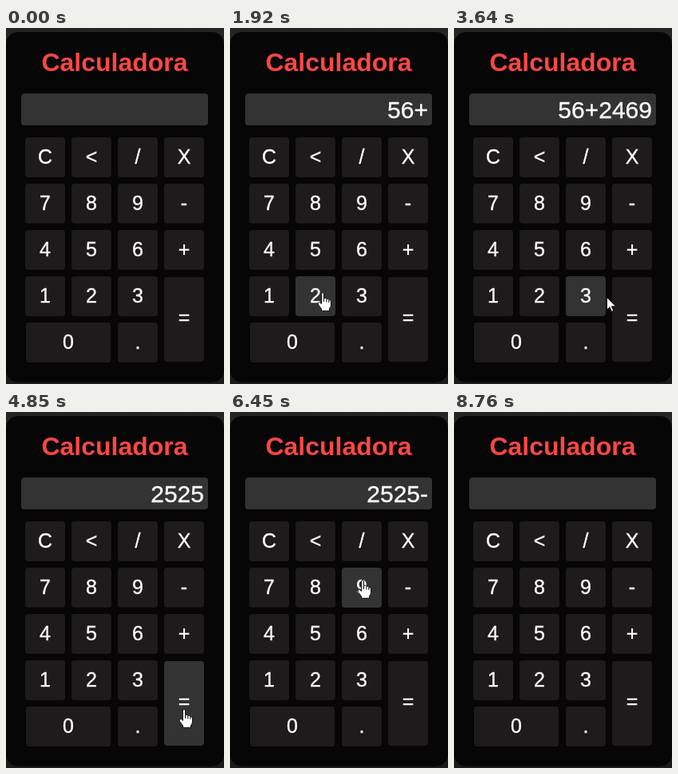
Write an HTML page that moves like this. It is 273 by 446 pixels and loops after 9.69 s.

```html
<!DOCTYPE html>
<html lang="es">
<head>
<meta charset="utf-8">
<title>Calculadora</title>
<style>
  html, body { margin: 0; width: 100%; height: 100%; overflow: hidden; background: #202020; }
  svg { display: block; width: 273px; height: 446px; }
  text { font-family: "Liberation Sans", Arial, sans-serif; fill: #fff; stroke: #fff; stroke-width: .35; }
  .title { font-size: 32px; font-weight: bold; fill: #ff4747; stroke: none; text-anchor: middle; }
  .screen { font-size: 30px; text-anchor: end; }
  .key text { font-size: 25px; text-anchor: middle; }
  .key rect { fill: #1d1b1b; }
  .key.hover rect { fill: #333; }
  .pointer path { fill: #fff; stroke: #111; stroke-width: 1; stroke-linejoin: round; }
</style>
</head>
<body>
<svg viewBox="0 0 273 446">
  <defs>
    <linearGradient id="edge" x1="0" y1="0" x2="0" y2="1">
      <stop offset="0" stop-color="#252525"/>
      <stop offset="1" stop-color="#1b1b1b"/>
    </linearGradient>
  </defs>
  <rect width="273" height="446" fill="url(#edge)"/>
  <rect y="5" width="273" height="439" rx="15" fill="#060606"/>
  <text class="title" x="136" y="54">Calculadora</text>
  <rect x="19" y="82" width="234" height="40" rx="4" fill="#333"/>
  <text class="screen" id="screen" x="248" y="113"></text>
  <g id="keys"></g>
  <g class="pointer" id="pointer">
    <path id="arrow" d="M.5 .5V16L4 12.7L6.4 18.3L8.8 17.3L6.4 11.8H11.6Z"/>
    <g id="hand">
      <path d="M-1.5 2Q-1.5 .5 0 .5Q1.5 .5 1.5 2V7.5Q4.3 6.6 4.8 8.4Q7.3 7.8 7.8 9.6Q10.5 9.2 10.5 12V16Q10.5 18.5 8.5 20.5V23.3H-1.5V21L-5.5 15.5Q-6.4 13.6 -5.2 12.7Q-3.6 11.8 -1.5 14.6Z"/>
      <path d="M1.5 7.5V12M4.8 8.5V12.5M7.8 9.7V13" style="fill:none"/>
    </g>
  </g>
</svg>
<script>
const LOOP = 9690;
const $ = id => document.getElementById(id);

const keys = [];
function addKey(label, x, y, w = 50, h = 50, base = y + h / 2 + 8) {
  const g = document.createElementNS("http://www.w3.org/2000/svg", "g");
  g.innerHTML = `<rect x="${x}" y="${y}" width="${w}" height="${h}" rx="4"/>
    <text x="${x + w / 2}" y="${base}"></text>`;
  g.lastElementChild.textContent = label;
  g.setAttribute("class", "key");
  $("keys").append(g);
  keys.push({ g, label, x, y, w, h });
}
["C</X", "789-", "456+", "123"].forEach((row, r) =>
  [...row].forEach((label, c) => addKey(label, 24 + 58 * c, 137 + 58 * r)));
addKey("0", 25, 369, 106);
addKey(".", 140, 369);
addKey("=", 198, 312, 50, 106, 371);

const within = (k, x, y, pad = 0) =>
  x >= k.x - pad && x <= k.x + k.w + pad && y >= k.y - pad && y <= k.y + k.h + pad;

// The calculator itself: reading after a key is pressed.
function press(reading, label) {
  if (label === "C") return "";
  if (label === "<") return reading.slice(0, -1);
  if (label === "=") return String(reading.split("+").reduce((sum, n) => sum + Number(n), 0));
  return reading + label;
}

// The session is told as glides, rests and taps, all in ms.
const START = 70;
let clock = START, place = { x: 194, y: 395 };
const glides = [], readings = [{ at: 0, text: "" }];

function glide(ms, x, y) {
  glides.push({ at: clock, ms, from: place, to: { x, y } });
  place = { x, y };
  clock += ms;
}
function rest(ms) { clock += ms; }
function tap(wait = 0) {
  rest(wait);
  const { label } = keys.find(k => within(k, place.x, place.y));
  readings.push({ at: clock, text: press(readings.at(-1).text, label) });
}

// 56+2469
glide(100, 180, 308); glide(180, 112, 279); tap(230);
rest(300); glide(150, 155, 276); tap(70);
glide(240, 222, 278); tap(150);
rest(70); glide(290, 116, 331); tap(130);
glide(250, 62, 284); tap(200);
glide(240, 131, 264); glide(90, 157, 273); tap(80);
glide(250, 136, 243); glide(210, 157, 218); tap(200);
// equals, then minus
glide(140, 191, 337); glide(280, 223, 372); tap(930);
glide(350, 228, 214); glide(210, 225, 218);
rest(150); glide(190, 220, 197); tap(350);
// delete three times, then clear and leave
glide(160, 194, 238); glide(600, 107, 150); tap();
tap(200); glide(130, 104, 150); tap();
rest(330); glide(210, 55, 165); glide(210, 52, 169); tap(200);
glide(620, 74, 450);
const END = clock;

function tipAt(t) {
  const { at, ms, from, to } = glides.findLast(g => g.at <= t) || glides[0];
  const k = Math.min(1, Math.max(0, (t - at) / ms));
  return [from.x + (to.x - from.x) * k, from.y + (to.y - from.y) * k].map(Math.round);
}

function draw(t) {
  const shown = t >= START && t < END;
  const [x, y] = tipAt(t);
  const onKey = keys.some(k => within(k, x, y));
  for (const k of keys)
    k.g.classList.toggle("hover", shown && within(k, x, y, 1.5));
  $("screen").textContent = readings.findLast(r => r.at <= t).text;
  $("pointer").style.display = shown ? "" : "none";
  $("pointer").setAttribute("transform", `translate(${x} ${y})`);
  $("hand").style.display = onKey ? "" : "none";
  $("arrow").style.display = onKey ? "none" : "";
}

const began = performance.now();
function tick() {
  draw((performance.now() - began) % LOOP);
  requestAnimationFrame(tick);
}
tick();
</script>
</body>
</html>
```
